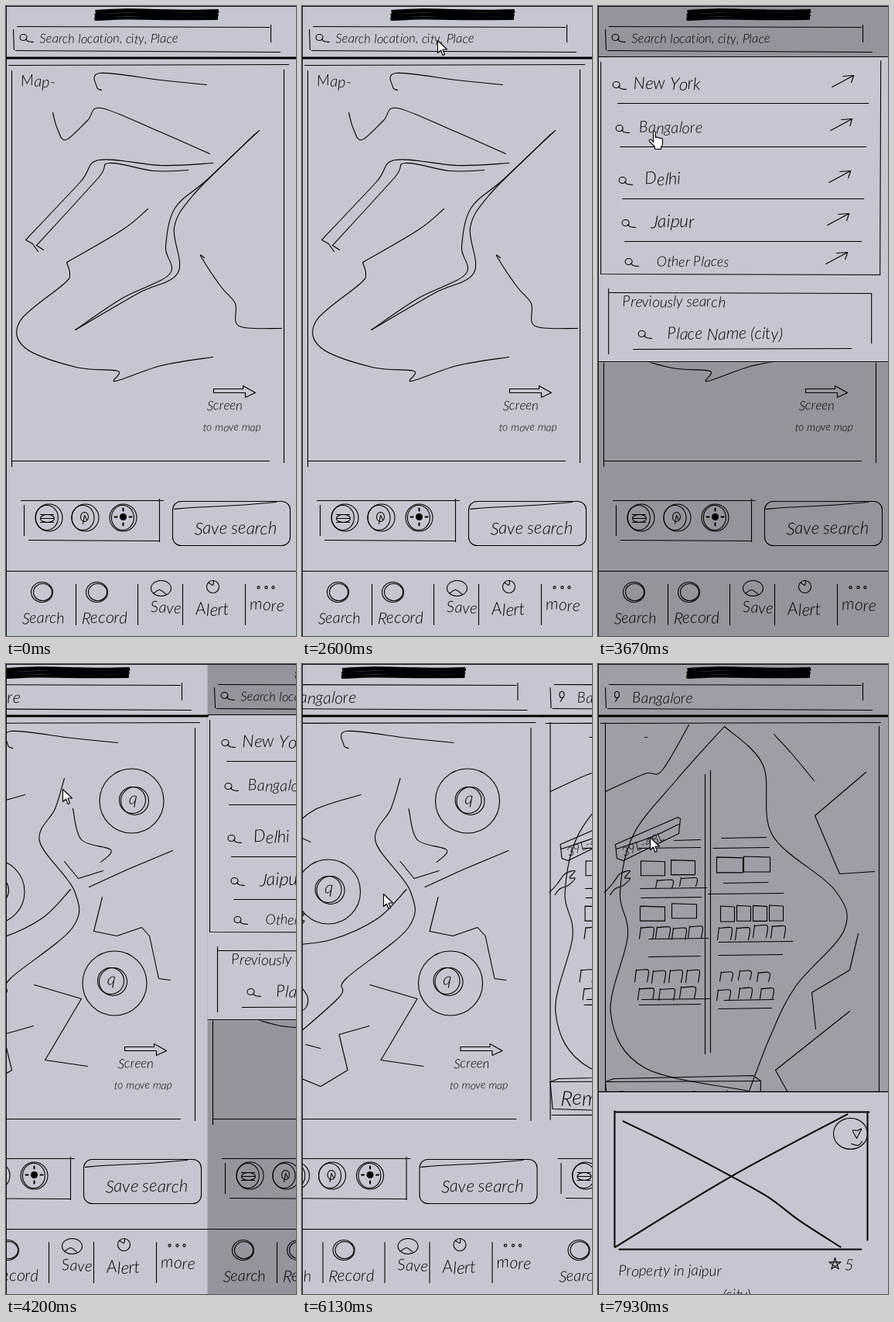
These frames come from a looping animation (375x812 px, 8 s). An HTML page with a canvas:

```html
<!DOCTYPE html>
<html lang="en">
<head>
<meta charset="utf-8">
<title>Map search wireframe</title>
<style>
html, body { margin: 0; width: 100%; height: 100%; overflow: hidden; background: #c5c7d0; }
canvas { display: block; width: 375px; height: 812px; }
</style>
</head>
<body>
<canvas></canvas>
<script>
const W = 375, H = 812, LOOP = 8000, PAPER = "#c5c7d0";
const LIST = 2600, CITY = 4003, PLOT = 6100, SHEET = 7740; // moments of the clicks
const canvas = document.querySelector("canvas"), ctx = canvas.getContext("2d");
const ratio = window.devicePixelRatio || 1;
canvas.width = W * ratio;
canvas.height = H * ratio;

// Repeatable value from -1 to 1 for hand-drawn irregularity
const wobble = seed => 2 * (Math.abs(Math.sin(seed * 12.99 + 4) * 43758.5) % 1) - 1;

function line(...n) {
  ctx.beginPath();
  for (let i = 0; i < n.length; i += 2) ctx.lineTo(n[i], n[i + 1]);
  ctx.stroke();
}
// Smooth stroke through all the given points
function curve(...n) {
  const last = n.length / 2 - 1;
  const p = i => { const k = 2 * Math.max(0, Math.min(last, i)); return [n[k], n[k + 1]]; };
  ctx.beginPath();
  ctx.moveTo(...p(0));
  for (let i = 0; i < last; i++) {
    const [a, b, c, d] = [p(i - 1), p(i), p(i + 1), p(i + 2)];
    ctx.bezierCurveTo(b[0] + (c[0] - a[0]) / 6, b[1] + (c[1] - a[1]) / 6,
      c[0] - (d[0] - b[0]) / 6, c[1] - (d[1] - b[1]) / 6, ...c);
  }
  ctx.stroke();
}
function ring(x, y, rx, ry = rx) {
  ctx.beginPath();
  ctx.ellipse(x, y, rx, ry, 0, 0, 7);
  ctx.stroke();
}
function at(x, y, draw) {
  ctx.save();
  ctx.translate(x, y);
  draw();
  ctx.restore();
}
function bold(width, draw) {
  ctx.lineWidth = width;
  draw();
  ctx.lineWidth = 1.1;
}
// Italic lettering with a slightly unsteady hand
function write(text, x, y, size, angle = 0) {
  at(x, y, () => {
    ctx.rotate(angle);
    ctx.font = `italic 300 ${size}px Lato, sans-serif`;
    [...text].forEach((char, i) => {
      at(0, wobble(i + text.length) * size * .05, () => {
        ctx.rotate(wobble(i * 3 + text.length) * .1);
        ctx.fillText(char, 0, 0);
      });
      ctx.translate(ctx.measureText(char).width, 0);
    });
  });
}
function magnifier(x, y) {
  ring(x + 5, y - 6, 4.5, 4);
  curve(x + 8, y - 4, x + 11, y - 1, x + 18, y);
}
function paper(height) {
  ctx.fillStyle = PAPER;
  ctx.fillRect(0, 0, W, height);
  ctx.fillStyle = "#000";
}

function chrome() {
  paper(H);
  bold(3, () => {
    for (let row = 0; row < 6; row++) {
      const y = 5 + row * 2.2, side = wobble(row);
      curve(116 + side, y + 1, 155, y + wobble(row + 9), 195, y, 235, y - wobble(row + 5), 273 + side, y);
    }
    line(0, 66.5, W, 66.5);
  });
  line(9, 30, 10, 56);
  line(14, 26, 340, 27);
  line(342, 24, 342, 46);
  line(12, 57, 354, 59);
  line(3, 76, 365, 75);
  toolbar();
  navigation();
}

function toolbar() {
  line(19, 637, 203, 637);
  line(23, 643, 23, 682);
  line(198, 635, 198, 690);
  line(29, 688, 198, 689);
  for (const x of [55, 102, 151]) {
    ring(x, 659, 17.5);
    ring(x + wobble(x) * 3, 659, 14.5, 16);
  }
  for (const y of [655, 660, 665]) line(44, y, 61, y);
  ring(53, 660, 9, 5);
  ring(101, 658, 5, 6);
  line(99, 667, 101, 656, 104, 662);
  ctx.beginPath();
  ctx.arc(151, 658, 4.5, 0, 7);
  ctx.fill();
  bold(2, () => {
    for (let a = 0; a < 4; a++) {
      const dx = Math.cos(a * Math.PI / 2), dy = Math.sin(a * Math.PI / 2);
      line(151 + 8 * dx, 658 + 8 * dy, 151 + 11 * dx, 658 + 11 * dy);
    }
  });
  ctx.beginPath();
  ctx.roundRect(215, 638, 152, 57, 11);
  ctx.stroke();
  curve(217, 648, 240, 646, 300, 643, 349, 639);
  write("Save search", 243, 680, 22);
}

function navigation() {
  line(0, 728, W, 728);
  for (const x of [90, 170, 228, 309]) line(x, 745, x, 797);
  for (const x of [46, 117]) {
    ring(x, 755, 14, 13);
    ring(x + 1, 755, 12, 11);
  }
  ring(200, 750, 13, 10);
  curve(190, 757, 198, 752, 207, 758);
  ring(267, 748, 8);
  curve(262, 743, 267, 746, 268, 740);
  for (const x of [326, 336, 345]) ring(x, 749, 1.6);
  write("Search", 20, 795, 20);
  write("Record", 97, 795, 21);
  write("Save", 187, 782, 20);
  write("Alert", 245, 785, 22);
  write("more", 315, 779, 21);
}

function mapFrame() {
  line(7, 83, 7, 593);
  line(359, 82, 359, 588);
  line(7, 586, 340, 586);
  write("Map-", 19, 104, 20);
  curve(123, 108, 117, 104, 121, 86, 200, 95, 259, 101);
  line(268, 493, 306, 493, 306, 489, 322, 498, 309, 504, 309, 498, 268, 498, 268, 493);
  write("Screen", 259, 520, 17);
  write("to move map", 254, 547, 14);
}

function homeScreen() {
  chrome();
  mapFrame();
  magnifier(17, 46);
  write("Search location, city, Place", 43, 47, 16.5);
  curve(60, 137, 66, 158, 77, 172, 105, 147, 122, 131, 190, 158, 263, 190);
  curve(267, 202, 200, 205, 120, 198, 95, 227, 25, 301);
  line(25, 301, 34, 306, 41, 316);
  curve(235, 211, 190, 212, 133, 202, 118, 222, 39, 308);
  line(39, 308, 48, 314);
  curve(327, 160, 295, 190, 240, 245, 217, 285, 222, 343, 170, 370, 89, 417);
  curve(322, 164, 260, 223, 218, 260, 206, 310, 211, 345, 150, 376, 89, 417);
  curve(183, 261, 150, 288, 78, 330);
  curve(78, 330, 82, 345, 74, 358, 18, 405, 24, 440, 90, 465, 144, 470, 141, 483, 200, 463, 267, 452);
  curve(256, 324, 252, 323, 278, 362, 296, 383, 301, 412, 356, 415);
}

function suggestion(text, i, baseline, size) {
  const tip = 330 - 2 * i, y = baseline - 18;
  magnifier(18 + 4 * i, baseline);
  write(text, 45 + 7.5 * i, baseline, size);
  line(tip - 28, y + 15, tip, y);
  line(tip - 14, y + 1, tip, y, tip - 3, y + 9);
  if (i < 4) line(25 + 3 * i, baseline + 18, 349 - 3 * i, baseline + 18);
}
function suggestions() {
  paper(0);
  ctx.fillStyle = PAPER;
  ctx.fillRect(0, 65, W, 394);
  ctx.fillStyle = "#000";
  line(0, 65, W, 65);
  line(0, 458, W, 458);
  line(365, 70, 364, 346);
  line(3, 72, 3, 345, 364, 346);
  line(13, 364, 13, 448);
  line(13, 369, 353, 370, 353, 434);
  line(45, 442, 327, 441);
  suggestion("New York", 0, 107, 22);
  suggestion("Bangalore", 1, 163, 20);
  suggestion("Delhi", 2, 230, 22);
  suggestion("Jaipur", 3, 285, 23);
  suggestion("Other Places", 4, 335, 18);
  write("Previously search", 31, 387, 19);
  magnifier(51, 428);
  write("Place Name (city)", 89, 429, 21);
}

function pin(x, y, iconX, iconY) {
  ring(x, y, 41.5);
  ring(iconX, iconY, 17);
  ring(iconX + 3, iconY + 1, 18);
  write("q", iconX - 5, iconY + 4, 22);
}
function pointingSketch(x, y) {
  curve(x, y, x + 10, y - 11, x + 20, y - 24, x + 33, y - 28, x + 26, y - 19, x + 33, y - 18,
    x + 24, y - 9, x + 14, y - 5, x + 7, y + 3);
}
function cityScreen() {
  chrome();
  mapFrame();
  magnifier(17, 46);
  write("Bangalore", 47, 50, 21);
  curve(139, 168, 80, 187, 53, 214, 74, 229);
  curve(190, 147, 178, 186, 158, 228, 203, 292, 200, 340, 120, 405, 110, 430, 32, 498);
  curve(201, 186, 212, 226, 250, 239, 237, 255);
  line(190, 254, 208, 276, 240, 266);
  line(222, 287, 270, 265, 330, 240);
  line(239, 300, 228, 344, 258, 350, 290, 339, 300, 350, 312, 405, 327, 407);
  curve(198, 290, 160, 328, 100, 355, 37, 363);
  curve(63, 376, 45, 392, 70, 428, 61, 446, 30, 424);
  line(151, 413, 212, 431, 165, 510, 220, 518);
  line(68, 490, 87, 495);
  line(150, 466, 111, 477, 122, 523, 87, 544, 48, 528, 48, 504);
  pin(277, 176, 278, 175);
  pin(97, 293, 97, 290);
  pin(255, 411, 250, 408);
  pointingSketch(33, 349);
}

function plots(x, y, count, step, w, h) {
  for (let i = 0; i < count; i++) {
    const left = x + i * step, top = y + wobble(x + y + i) * 2;
    line(left, top + h, left, top, left + w, top + 1, left + w, top + h, left, top + h);
  }
}
function arches(x, y, count, step, w, h) {
  for (let i = 0; i < count; i++) {
    const left = x + i * step, top = y + wobble(x + y + i) * 2;
    line(left - 1, top + h, left + 1, top);
    curve(left + 1, top + 1, left + w - 3, top, left + w, top + 3, left + w - 2, top + h);
  }
}
function streets(x, width, ...ys) {
  for (const y of ys) line(x + wobble(y) * 8, y, x + width + wobble(y + 1) * 8, y - 1);
}
function plotScreen() {
  chrome();
  ring(24, 39, 3, 4);
  line(25, 43, 22, 48);
  write("Bangalore", 44, 50, 19);
  line(9, 75, 9, 587);
  line(363, 80, 363, 587);
  line(11, 581, 343, 580);
  line(60, 94, 63, 94);
  curve(117, 78, 82, 137, 60, 141, 9, 164);
  curve(163, 80, 100, 150, 45, 220, 28, 295, 38, 350, 16, 450, 60, 520, 195, 550);
  curve(195, 550, 222, 480, 255, 415, 318, 342, 305, 290, 225, 220, 213, 130, 163, 80);
  curve(227, 90, 250, 115, 279, 150);
  line(346, 139, 280, 195, 312, 270, 357, 267);
  line(336, 347, 325, 394, 276, 423, 281, 470);
  line(325, 447, 229, 523, 253, 566);
  line(138, 142, 138, 502);
  line(145, 137, 145, 500);

  streets(104, 27, 227);
  streets(58, 78, 237, 289, 301, 354, 377, 432, 439);
  streets(155, 70, 224, 237, 282, 433, 444);
  streets(148, 97, 296, 358, 375);
  plots(55, 252, 2, 39, 31, 19);
  plots(153, 248, 2, 35, 34, 20);
  plots(54, 310, 2, 41, 32, 19);
  plots(158, 312, 4, 21, 18, 20);
  arches(75, 277, 2, 31, 22, 11);
  arches(54, 338, 4, 21, 18, 15);
  arches(155, 338, 4, 23, 18, 16);
  arches(48, 394, 4, 22, 17, 16);
  arches(158, 395, 3, 24, 16, 12);
  arches(52, 416, 3, 27, 20, 15);
  arches(154, 418, 3, 28, 17, 14);

  line(24, 250, 22, 232, 103, 197, 106, 199, 104, 218, 32, 253, 24, 250);
  curve(23, 238, 70, 222, 104, 206);
  write("39L-48L", 33, 248, 16, -.4);
  pointingSketch(8, 294);

  line(9, 538, 20, 534, 200, 530, 210, 537, 209, 579, 12, 573, 9, 538);
  line(9, 538, 209, 537);
  write("Remove Border", 22, 568, 27);
}

function propertySheet() {
  paper(330);
  line(0, 0, W, 0);
  bold(2, () => {
    line(21, 26, 350, 26);
    line(21, 25, 21, 200);
    line(27, 203, 340, 203);
    line(348, 26, 348, 191);
    curve(322, 29, 172, 109, 22, 200);
    curve(32, 38, 90, 66, 172, 109, 220, 136, 260, 166, 313, 200);
  });
  ring(326, 54, 22, 20);
  curve(334, 60, 329, 50, 335, 50, 340, 48, 334, 60);
  curve(327, 67, 336, 69, 341, 64);
  const star = [];
  for (let i = 0; i < 6; i++) star.push(306 + 8 * Math.sin(i * Math.PI * .8), 222 - 8 * Math.cos(i * Math.PI * .8));
  line(...star);
  write("Property in jaipur", 26, 237, 19);
  write("5", 318, 229, 20);
  write("(city)", 160, 268, 19);
}

// Each move: start, end, x, y and, where it reaches a button, the time the hand is dropped
const moves = [
  [400, 700, 225, 728], [700, 1000, 225, 815], [1390, 1400, 244, 513],
  [1400, 1900, 113, 160], [1900, 2200, 159, 58], [2270, 2400, 175, 44, LIST],
  [3100, 3670, 73, 161, CITY], [4270, 4800, 92, 305, 4950], [4900, 5070, 111, 389],
  [5300, 5600, 105, 296, PLOT], [7150, 7530, 67, 223, SHEET]];
function pointer(t) {
  if (t < 400) return;
  let x = 385, y = 770, hand = false;
  for (const [from, to, endX, endY, release] of moves) {
    const k = Math.max(0, Math.min(1, (t - from) / (to - from)));
    x += (endX - x) * k;
    y += (endY - y) * k;
    hand ||= t > to - 70 && t < release;
  }
  const shape = new Path2D(hand
    ? "M6 14V2q0-2 1.5-2T9 2v6q1.5-1.5 3 .5q1.5-1 3 .7q2.5-.8 3 1.3v5q0 3-2 5v2.5H8V20L1 13q-1-2 1-2.5t4 3.5z"
    : "M0 0V16L4 12.5L6.5 19L9 18L6.5 11.5H12Z");
  at(hand ? x - 8 : x, y, () => {
    ctx.fillStyle = "#fff";
    ctx.fill(shape);
    ctx.stroke(shape);
  });
}

function spring(ms) {
  const s = ms / 1000;
  return 1 - Math.exp(-7.5 * s) * (Math.cos(6.614 * s) + 1.134 * Math.sin(6.614 * s));
}
const easeOut = ms => 1 - (1 - Math.min(1, ms / 300)) ** 1.7;
function shade(amount) {
  ctx.fillStyle = `rgba(0,0,0,${.25 * Math.min(1, amount)})`;
  ctx.fillRect(-1, -1, W + 1, H + 1);
}

function homeScene(t) {
  homeScreen();
  if (t < LIST) return;
  const shown = spring(t - LIST);
  shade(shown);
  at(W * (1 - shown), 0, suggestions);
}
function plotScene(t) {
  plotScreen();
  if (t < SHEET) return;
  const shown = easeOut(t - SHEET);
  shade(shown);
  at(0, H - 318 * shown, propertySheet);
}

function render(t) {
  ctx.setTransform(ratio, 0, 0, ratio, 0, 0);
  paper(H);
  ctx.strokeStyle = "#000";
  ctx.lineWidth = 1.1;
  ctx.lineCap = ctx.lineJoin = "round";
  at(.5, .5, () => {
    if (t < CITY) homeScene(t);
    else if (t < PLOT) {
      const shift = W * spring(t - CITY);
      if (shift < W) at(shift, 0, () => homeScene(t));
      at(shift - W, 0, cityScreen);
    } else {
      const shift = W * easeOut(t - PLOT);
      if (shift < W) at(-shift, 0, cityScreen);
      at(W - shift, 0, () => plotScene(t));
    }
    pointer(t);
  });
  ctx.fillStyle = "#111";
  ctx.fillRect(0, 0, W, 1);
  ctx.fillRect(0, 0, 1, H);
}

const start = performance.now();
function tick() {
  render((performance.now() - start) % LOOP);
  requestAnimationFrame(tick);
}
tick();
</script>
</body>
</html>
```
